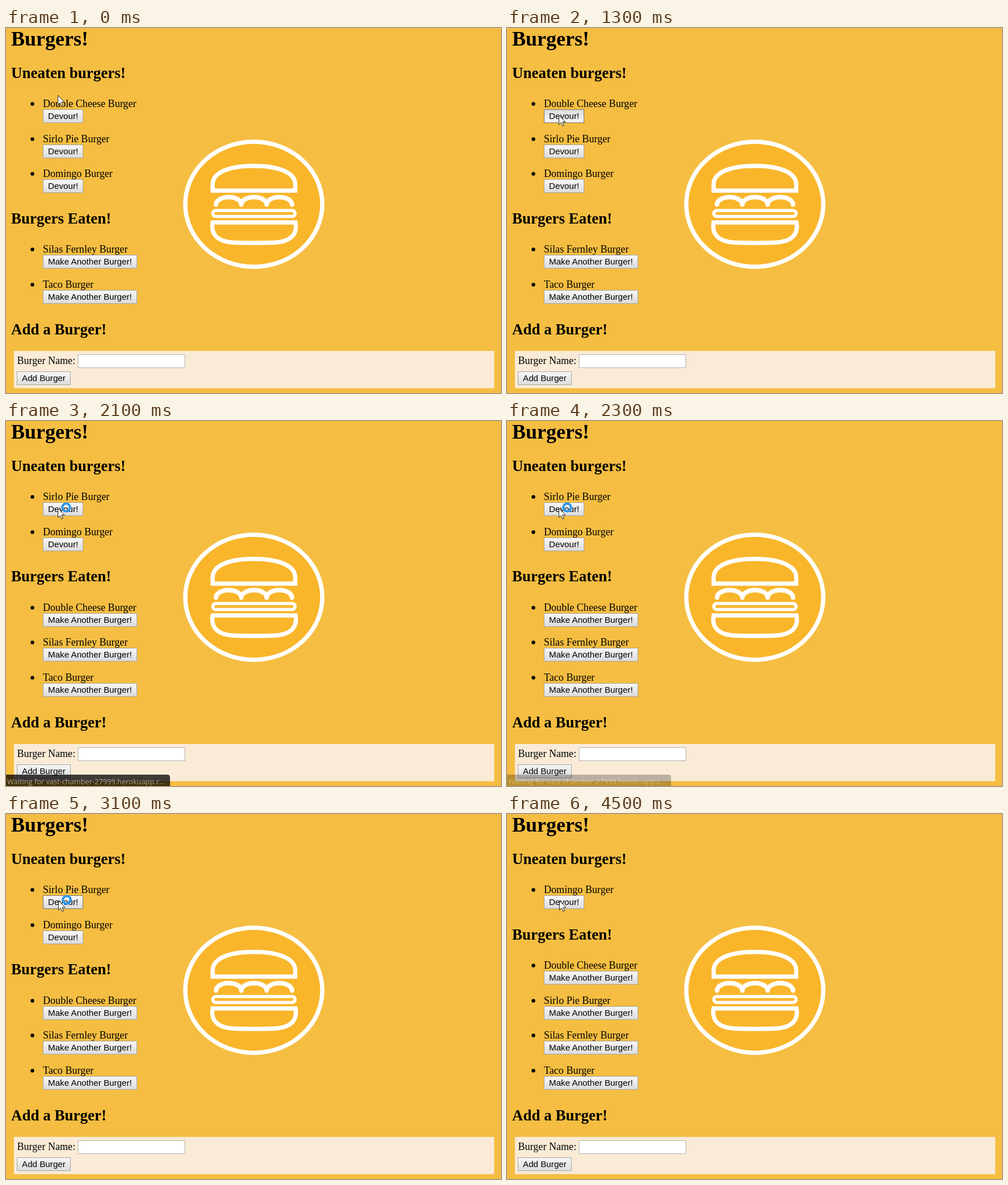
Animation, 872 px wide and 642 px high, one loop 4800 ms. Source, as an HTML page:

```html
<!DOCTYPE html>
<html lang="en">
<head>
<meta charset="utf-8">
<title>Burgers!</title>
<style>
  html, body { margin: 0; width: 100%; height: 100%; overflow: hidden; background: #f5be42; }
  svg { display: block; width: 872px; height: 642px; }
  text { font: 18.1px "Liberation Serif", serif; white-space: pre; }
  .h1 { font-size: 36px; font-weight: bold; }
  .h2 { font-size: 27px; font-weight: bold; }
  .label { font: 15.2px "Liberation Sans", sans-serif; }
  .status { font: 12.8px "Open Sans", sans-serif; fill: #9a9a9a; }
  .icon { fill: none; stroke: #fff; stroke-width: 7.5; }
</style>
</head>
<body>
<svg viewBox="0 0 872 642">
  <defs>
    <linearGradient id="raised" x2="0" y2="1"><stop stop-color="#f7f7f7"/><stop offset="1" stop-color="#dcdcdc"/></linearGradient>
    <linearGradient id="pressed" x2="0" y2="1"><stop stop-color="#dcdcdc"/><stop offset="1" stop-color="#f7f7f7"/></linearGradient>
  </defs>
  <rect width="872" height="642" fill="#f5be42"/>
  <g class="icon">
    <ellipse cx="436.5" cy="310" rx="120.7" ry="110" fill="#f9b62b"/>
    <path d="M364 286V275C364 253 396 242.5 436.5 242.5S509.5 253 509.5 275V286Z"/>
    <path d="M370 310.5a22.3 13 0 0 1 44.6 0a22.3 13 0 0 1 44.6 0a22.3 13 0 0 1 44.6 0" stroke-width="8" stroke-linecap="round" stroke-linejoin="round"/>
    <rect x="364.3" y="321" width="145" height="10.5" rx="5.2" stroke-width="5.6"/>
    <path d="M364 342C360 364 374 377 404 377.5Q437 378.5 470 377.5C500 377 514 364 510 342Z"/>
  </g>
  <g id="page"></g>
  <g id="status">
    <path d="M0 622H284q5 0 5 5V642H0Z"/>
    <text class="status" x="2" y="639">Waiting for vast-chamber-27999.herokuapp.c...</text>
  </g>
  <g id="pointer">
    <path d="M.5 .5V17L4.3 13.4L6.9 19.4L9.4 18.3L6.9 12.4H12Z" fill="#fff" stroke="#222"/>
    <circle id="spinner" cx="15" cy="-1" r="6.8" fill="none" stroke="#2b98ec" stroke-width="4"/>
  </g>
</svg>
<script>
const LOOP = 4800, PITCH = 61.67;
const burgers = ["Double Cheese", "Sirlo Pie", "Domingo", "Silas Fernley", "Taco"];
const byId = id => document.getElementById(id);

const text = (x, y, content, cls = "") =>
  `<text class="${cls}" x="${x}" y="${y}">${content}</text>`;

const button = (x, y, width, label, state = "") =>
  `<rect x="${x + .5}" y="${y + .5}" width="${width - 1}" height="23"
    fill="url(#${state === "pressed" ? "pressed" : "raised"})" stroke="${state ? "#777" : "#a5a5a5"}"/>` +
  text(x + 9, y + 17, label, "label");

function item(name, y, eaten, state) {
  const base = Math.round(y);
  return `<circle cx="46.5" cy="${base - 5.5}" r="3.2"/>` +
    text(65, base, name + " Burger") +
    (eaten ? button(65, base + 4, 166, "Make Another Burger!")
           : button(65, base + 4, 71, "Devour!", state));
}

// Uneaten items grow down from the top; eaten ones end at a fixed row.
function page(devoured, state) {
  const fresh = burgers.slice(devoured, 3);
  const eaten = [...burgers.slice(0, devoured), ...burgers.slice(3)];
  const lift = devoured * PITCH;
  return text(9, 31, "Burgers!", "h1") +
    text(9, 88, "Uneaten burgers!", "h2") +
    fresh.map((name, i) => item(name, 139 + i * PITCH, false, i ? "" : state)).join("") +
    text(9, Math.round(344 - lift), "Burgers Eaten!", "h2") +
    eaten.map((name, i) => item(name, 395.3 - lift + i * PITCH, true)).join("") +
    text(9, 539, "Add a Burger!", "h2") +
    `<rect x="14" y="568" width="846" height="65.5" fill="#faebd7"/>` +
    text(19.5, 591, "Burger Name:") +
    `<rect x="127" y="574.5" width="188" height="23" fill="#fff" stroke="#b0b0b0"/>` +
    button(19, 604, 95, "Add Burger");
}

function pointerAt(t) {
  if (t < 2700) return [91, 118 + 7 * Math.min(5, Math.max(0, Math.floor(t / 100) - 2))];
  return [92, t < 2800 ? 153 : 152];
}

function buttonState(t, y) {
  if ((t >= 1300 && t < 1500) || (t >= 2900 && t < 3100)) return "pressed";
  const hovering = t < 2100 ? y >= 144 : t >= 2700 && t < 3500;
  return hovering ? "hover" : "";
}

function statusOpacity(t) {
  if (t < 1800 || t >= 2400) return 0;
  if (t < 1900) return .5;
  return t < 2100 ? 1 : (2400 - Math.floor(t / 100) * 100) / 400;
}

let shown = "";
function draw() {
  const t = performance.now() % LOOP;
  const [x, y] = pointerAt(t);
  const devoured = t < 2100 ? 0 : t < 3500 ? 1 : 2;
  const state = buttonState(t, y);
  if (shown !== devoured + state) {
    shown = devoured + state;
    byId("page").innerHTML = page(devoured, state);
  }
  byId("pointer").setAttribute("transform", `translate(${x} ${y})`);
  byId("spinner").setAttribute("opacity", t >= 1800 && t < 4500 ? 1 : 0);
  byId("status").setAttribute("opacity", statusOpacity(t));
  requestAnimationFrame(draw);
}
draw();
</script>
</body>
</html>
```
